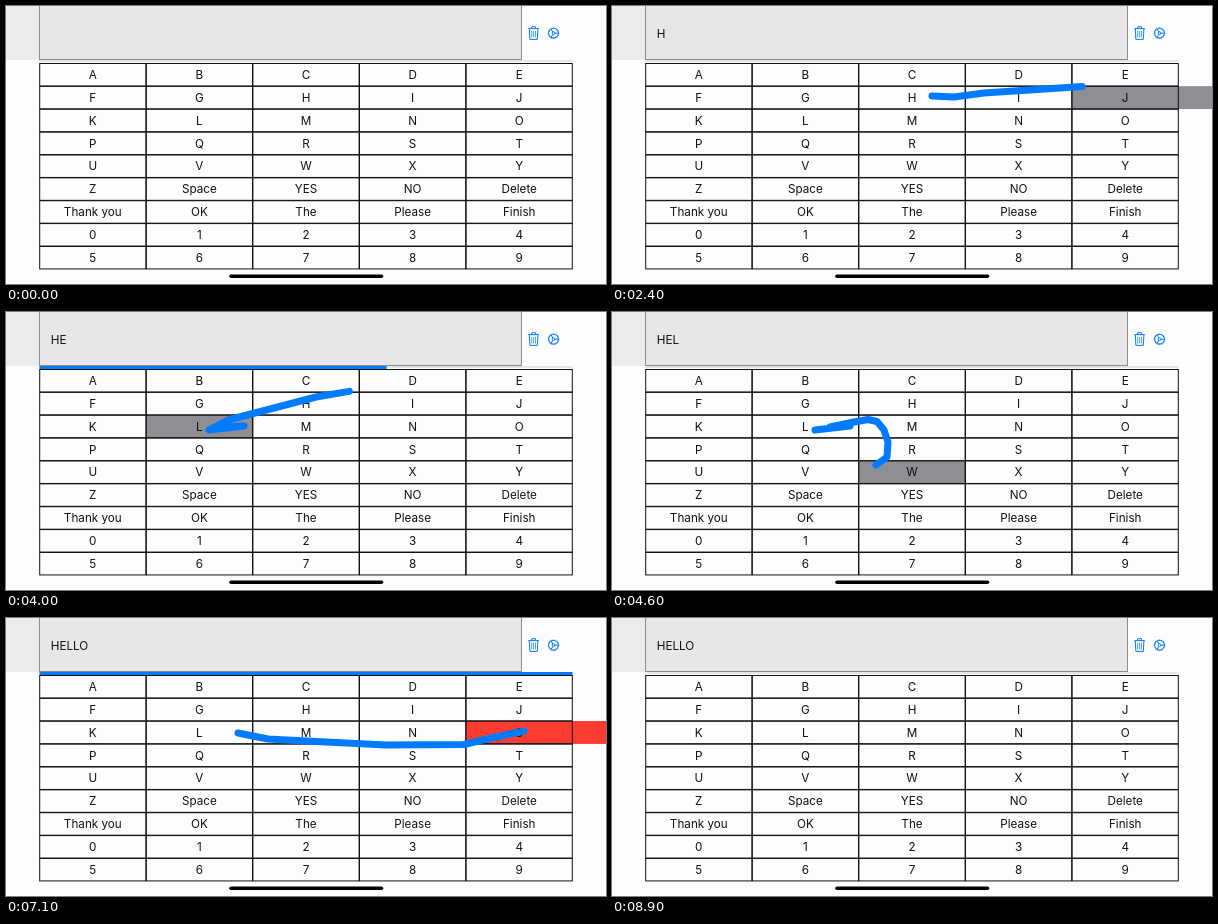
Recreate the animation shown at these times as an HTML page with a canvas. Size 600x278 px, loop 9300 ms.

```html
<!DOCTYPE html>
<html lang="en">
<head>
<meta charset="utf-8">
<title>Swipe board</title>
<style>
  html, body { margin: 0; width: 100%; height: 100%; overflow: hidden; background: #fdfdfe; }
  canvas { display: block; width: 600px; height: 278px; }
</style>
</head>
<body>
<canvas id="stage"></canvas>
<script>
const LOOP = 9300, STEP = 100, TRAIL = 500;
const START = 1100, END = 8400;
const BLUE = '#007aff', RED = '#fc3b31', GRAY = '#8e8e93';
const GRID = { x: 33.5, y: 57.3, w: 106.6, h: 22.87, columns: 5 };
const labels = [
  ...'ABCDEFGHIJKLMNOPQRSTUVWXYZ', 'Space', 'YES', 'NO', 'Delete',
  'Thank you', 'OK', 'The', 'Please', 'Finish', ...'0123456789'
];

// Each dwell fills the bar from start to full, then holds the cell until release.
const dwells = [
  { start: 1300, full: 1850, release: 2200, text: 'H' },
  { start: 2500, full: 2900, release: 3250, text: 'E' },
  { start: 3720, full: 4150, release: 4450, text: 'L' },
  { start: 4880, full: 5350, release: 5650, text: 'L' },
  { start: 6500, full: 6750, release: 7150, text: 'O' },
  { start: 7800, full: 8300, release: 8400, text: '' }
];

// Pointer path as [time, x, y]; its clock stands still while a cell is held.
const path = [
  [1080, 296, 72], [1250, 305, 85], [1550, 320, 90], [1850, 342, 91],
  [1910, 372, 87], [1980, 425, 83.5], [2050, 470, 80.5], [2150, 474, 79.3],
  [2220, 479, 78.5], [2550, 523, 71], [2580, 523, 69.5], [2700, 410, 68],
  [2850, 310, 85], [3020, 222, 108], [3100, 203, 118], [3200, 238, 114],
  [3300, 218, 115], [3450, 242, 110], [3475, 256, 107.5], [3500, 265, 109.5],
  [3525, 272, 118], [3550, 276, 130], [3580, 275, 145], [3600, 264, 153],
  [3700, 250, 146], [3880, 222, 124.5], [4100, 210, 118], [4350, 209, 114],
  [4380, 213, 112.5], [4600, 280, 121], [4700, 275, 147], [4750, 268, 157],
  [4800, 258, 147], [4950, 232, 115], [5030, 262, 121], [5080, 320, 124],
  [5120, 380, 127], [5180, 458, 126.5], [5230, 485, 120], [5450, 518, 113],
  [5800, 540, 160], [6100, 520, 200], [6300, 512, 207], [6600, 515, 208]
];

const canvas = document.getElementById('stage');
const ctx = canvas.getContext('2d');
const scale = window.devicePixelRatio || 1;
canvas.width = 600 * scale;
canvas.height = 278 * scale;

const clamp = (value, low, high) => Math.min(high, Math.max(low, value));

function box(x, y, w, h, color) {
  ctx.fillStyle = color;
  ctx.fillRect(x, y, w, h);
}

function line(points, width, color) {
  ctx.beginPath();
  points.forEach(([x, y]) => ctx.lineTo(x, y));
  ctx.lineWidth = width;
  ctx.strokeStyle = color;
  ctx.stroke();
}

function write(text, x, y, align) {
  ctx.font = '11.7px Inter, "Liberation Sans", sans-serif';
  ctx.textAlign = align;
  ctx.fillStyle = '#111';
  ctx.fillText(text, x, y);
}

function pathTime(t) {
  return dwells.reduce(
    (sum, d) => sum - clamp(t - d.full, 0, d.release - d.full), t);
}

function pointAt(time) {
  const next = path.findIndex(p => p[0] >= time);
  if (next === 0) return path[0].slice(1);
  if (next < 0) return path[path.length - 1].slice(1);
  const [t0, x0, y0] = path[next - 1], [t1, x1, y1] = path[next];
  const k = (time - t0) / (t1 - t0);
  return [x0 + (x1 - x0) * k, y0 + (y1 - y0) * k];
}

function drawTrash() {
  line([[522.3, 22.6], [532.9, 22.6]], 1, BLUE);
  line([[525.5, 22.3], [525.8, 20.7], [529.4, 20.7], [529.7, 22.3]], 1, BLUE);
  line([[523.3, 23], [523.9, 33.4], [531.3, 33.4], [531.9, 23]], 1, BLUE);
  for (const x of [525.7, 527.6, 529.5]) line([[x, 24.8], [x, 31.4]], 0.7, BLUE);
}

function drawGear() {
  const x = 547.5, y = 27.2;
  const polar = (r, a) => [x + r * Math.cos(a), y + r * Math.sin(a)];
  ctx.beginPath();
  ctx.arc(x, y, 4.9, 0, 2 * Math.PI);
  ctx.lineWidth = 1.1;
  ctx.strokeStyle = BLUE;
  ctx.stroke();
  for (let i = 0; i < 16; i++) {
    const a = i * Math.PI / 8;
    line([polar(5.3, a), polar(5.9, a)], 0.8, BLUE);
  }
  for (let i = 0; i < 3; i++) {
    const a = i * 2 * Math.PI / 3;
    line([polar(1.2, a), polar(4.8, a)], 1, BLUE);
  }
  ctx.beginPath();
  ctx.arc(x, y, 1.3, 0, 2 * Math.PI);
  ctx.stroke();
}

function drawHeader(text, progress) {
  box(0, 0, 33.5, 54, '#ebebed');
  box(33.5, 0, 482, 54, '#e8e6e9');
  ctx.lineWidth = 1;
  ctx.strokeStyle = '#8c8b8e';
  ctx.strokeRect(33.5, -0.5, 482, 54);
  box(33.5, 54, 533, 2, '#e4e4e6');
  box(33.5, 54, 533 * progress, 3, BLUE);
  write(text, 44.7, 31.5, 'left');
  drawTrash();
  drawGear();
}

function drawGrid(hover, color) {
  const { x, y, w, h, columns } = GRID;
  labels.forEach((label, i) => {
    const column = i % columns, row = Math.floor(i / columns);
    const left = x + column * w, top = y + row * h;
    if (i === hover) {
      box(left, top, column === columns - 1 ? 600 - left : w, h, color);
    }
    ctx.lineWidth = 1;
    ctx.strokeStyle = '#111';
    ctx.strokeRect(left + 0.2, top + 0.2, w - 0.4, h - 0.4);
    write(label, left + w / 2, top + h / 2 + 4.2, 'center');
  });
}

function drawTrail(now) {
  const points = [pointAt(Math.max(path[0][0], now - TRAIL))];
  for (const [time, x, y] of path) {
    if (time > now - TRAIL && time < now) points.push([x, y]);
  }
  points.push(pointAt(now));
  ctx.lineCap = ctx.lineJoin = 'round';
  line(points, 7, BLUE);
  ctx.lineCap = 'butt';
  ctx.lineJoin = 'miter';
}

function draw(t) {
  ctx.setTransform(scale, 0, 0, scale, 0, 0);
  box(0, 0, 600, 278, '#fdfdfe');

  const text = dwells.filter(d => d.full <= t).map(d => d.text).join('');
  const dwell = dwells.find(d => t >= d.start && t < d.release);
  const progress = dwell ? clamp((t - dwell.start) / (dwell.full - dwell.start), 0, 1) : 0;
  const touching = t >= START && t < END;
  const now = pathTime(t);

  let hover = -1;
  if (touching) {
    const [x, y] = pointAt(now);
    hover = Math.floor((y - GRID.y) / GRID.h) * GRID.columns + Math.floor((x - GRID.x) / GRID.w);
  }
  drawHeader(text, progress);
  drawGrid(hover, progress === 1 ? RED : GRAY);
  if (touching) drawTrail(now);

  ctx.lineCap = 'round';
  line([[225, 270.3], [375.5, 270.3]], 3.6, '#000');
  ctx.lineCap = 'butt';
}

const origin = performance.now();
function frame() {
  const elapsed = (performance.now() - origin) % LOOP;
  draw(Math.floor(elapsed / STEP) * STEP);
  requestAnimationFrame(frame);
}
frame();
</script>
</body>
</html>
```
